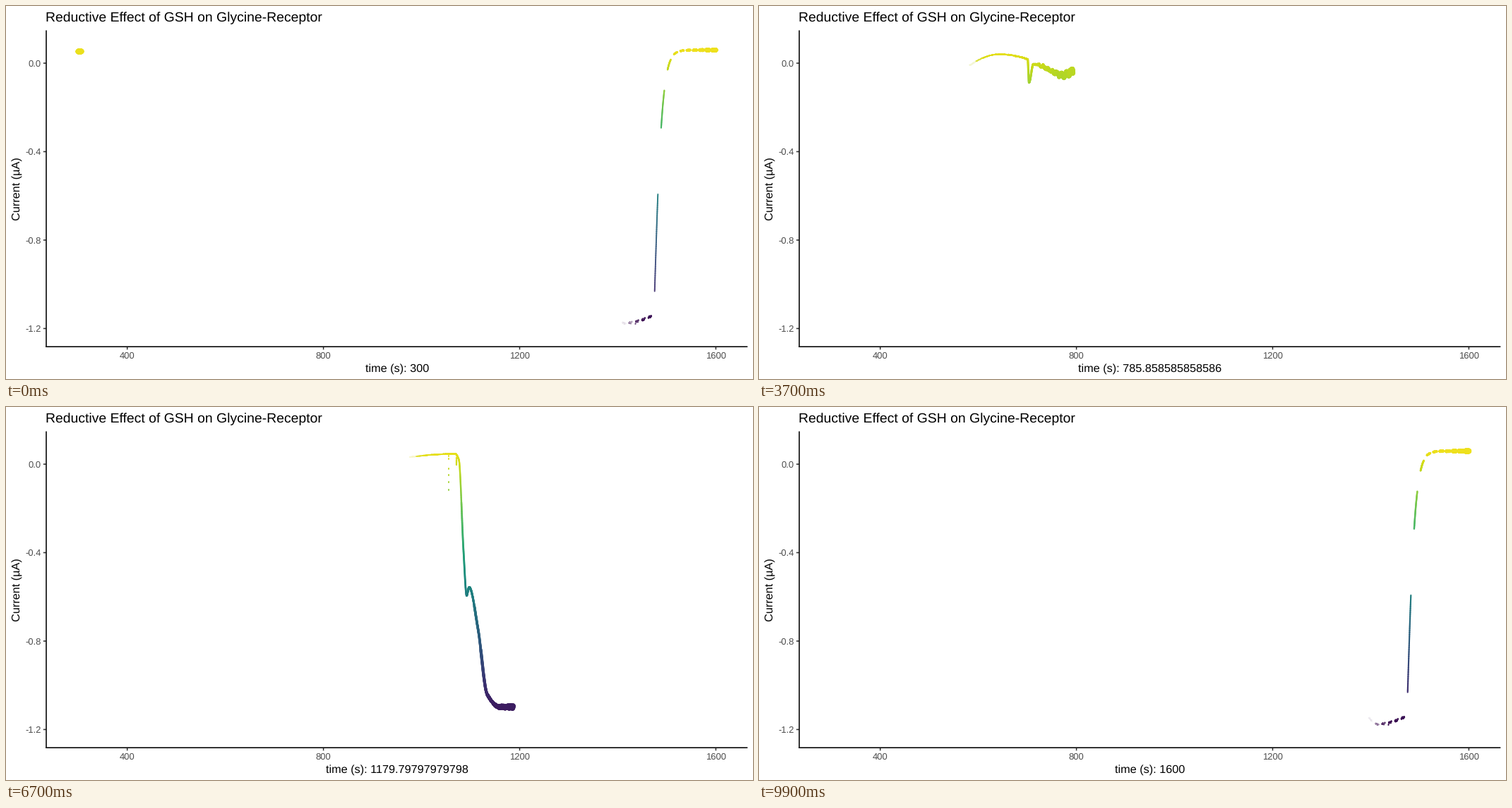
These frames come from a looping animation (1058x529 px, 10000 ms). A matplotlib script:

```python
import numpy as np
import matplotlib.pyplot as plt
from matplotlib.animation import FuncAnimation
from matplotlib.collections import LineCollection

W, H, FRAMES, WAKE = 1058, 529, 100, 15
PT = 0.72                       # points per pixel at 100 dpi
X0, X1 = 101.7, 1004.9          # x of 300 s and 1600 s
Y0, UNIT = 80.6, 313.6          # y of 0 uA, pixels per uA
SPEED = (X1 - X0) / 1300        # pixels per second
STEP = (X1 - X0) / (FRAMES - 1)
RATE = 500                      # samples per second
DX = 0.1
SPARSE = 83                     # later slices hold only their first half

plt.rcParams["font.family"] = "Liberation Sans"
plt.rcParams["text.hinting"] = "none"
fig = plt.figure(figsize=(W / 100, H / 100), dpi=100, facecolor="white")
ax = fig.add_axes([0, 0, 1, 1])
ax.set_xlim(-0.5, W - 0.5)
ax.set_ylim(H - 0.5, -0.5)
ax.axis("off")

# turning points of the current, then the washouts: start, from, to, length
KEYS = np.array([
    (101, 64), (163, 64), (166, 72), (170.5, 180), (180.7, 345), (186.5, 327),
    (200, 404), (222, 461), (250.3, 446), (298, 84), (340, 68), (380, 75),
    (382, 108), (388, 82), (432, 98), (448, 90), (470, 103), (526, 104),
    (537, 83), (554, 73), (636, 66), (641, 75), (647.5, 204), (652, 267),
    (655.5, 255), (668, 314), (681, 407), (699, 425), (718, 424), (817, 63),
    (828, 200), (845, 399), (876, 449), (917, 437), (1005, 62)])
WASHOUTS = [(250.3, 446, 83, 48), (718, 424, 63, 90), (917, 437, 62, 88)]
SPIKES = [(475, 80, 106), (488, 97, 127), (626, 66, 171), (637, 67, 83),
          (790, 54, 72), (972, 58, 66)]


def monotone(px, py, x):
    """Cubic interpolation without overshoot."""
    h = np.diff(px)
    d = np.diff(py) / h
    m = np.zeros(len(px))
    a, b = d[:-1], d[1:]
    ok = a * b > 0
    m[1:-1][ok] = 2 * a[ok] * b[ok] / (a[ok] + b[ok])
    i = np.clip(np.searchsorted(px, x, side="right") - 1, 0, len(h) - 1)
    s = (x - px[i]) / h[i]
    return (py[i] * (1 + 2 * s) * (1 - s) ** 2 + py[i + 1] * s * s * (3 - 2 * s)
            + h[i] * (m[i] * s * (1 - s) ** 2 - m[i + 1] * s * s * (1 - s)))


def trace():
    rng = np.random.default_rng(4)
    x = np.arange(X0, X1 + DX / 2, DX)
    y = monotone(KEYS[:, 0], KEYS[:, 1], x)
    for start, high, low, length in WASHOUTS:
        on = (x >= start) & (x < start + length)
        y[on] = low + (high - low) * np.exp(-((x[on] - start) / 8.8) ** 1.2)
    noise = np.convolve(rng.normal(size=len(x)), np.ones(6) / 6 ** 0.5, "same")
    unrest = np.clip(np.minimum(x - 390, 550 - x) / 12, 0, 1)
    jitter = 0.15 + 0.6 * (y > 422) + 0.9 * unrest
    return x, y + jitter * noise + 1.8 * unrest * np.sin(x * 0.95)


def build_segments():
    pts = np.column_stack(trace())
    line = np.stack([pts[:-1], pts[1:]], axis=1)
    dots = [[(x, y), (x, y + 0.8)] for x, top, bottom in SPIKES
            for y in top + (bottom - top) * np.linspace(0, 1, 12) ** 1.6]
    segs = np.concatenate([line, np.array(dots)])

    length = np.hypot(*(segs[:, 1] - segs[:, 0]).T)
    density = RATE * DX / SPEED / length          # samples per pixel of path

    mid = segs.mean(axis=1)
    pos = (mid[:, 0] - X0) / STEP
    slot = np.clip(np.round(pos), 0, FRAMES - 1).astype(int)
    keep = (slot < SPARSE) | (pos <= slot)

    level = np.clip(((Y0 - mid[:, 1]) / UNIT + 1.218) / 1.301, 0, 1)
    rgb = plt.get_cmap("viridis")(level)[:, :3] * (0.82 + 0.16 * level[:, None])
    return segs[keep], slot[keep], rgb[keep], density[keep]


def label(x, y, s, size, color="black", **kw):
    return ax.text(x, y, s, fontsize=size * PT, color=color, **kw)


def rule(xs, ys, color="black"):
    ax.plot(xs, ys, color=color, lw=1.57 * PT, solid_capstyle="butt", snap=False)


def draw_axes():
    for i in range(4):
        x = 171.2 + 277.9 * i
        rule([x, x], [482.7, 486.8], "#333333")
        label(x, 499.2, str(400 * (i + 1)), 12.97, "#4d4d4d", ha="center")
        y = Y0 + 0.4 * UNIT * i
        rule([52.4, 56.5], [y, y], "#333333")
        label(49.2, y + 4.6, "%.1f" % (-0.4 * i if i else 0), 12.97, "#4d4d4d",
              ha="right")
    rule([56.5, 56.5], [34, 483.4])
    rule([55.7, 1049.8], [482.7, 482.7])
    label(56, 22, "Reductive Effect of GSH on Glycine-Receptor", 19.4)
    label(19.5, 258.5, "Current (\u00b5A)", 16.2, rotation=90,
          rotation_mode="anchor", ha="center")


SEGS, SLOT, RGB, DENSITY = build_segments()
draw_axes()
clock = label(553.2, 518, "", 16.2, ha="center")
wake = LineCollection([], capstyle="round", zorder=3)
ax.add_collection(wake, autolim=False)


def update(n):
    lag = (n - SLOT) % FRAMES
    order = np.argsort(-lag, kind="stable")
    order = order[lag[order] <= WAKE]
    fade = (1 - lag[order] / (WAKE + 1)) ** 3
    width = 1.6 + 6.1 * fade
    # overlapping faint samples add up to this cover
    cover = 1 - np.exp(-fade * width * DENSITY[order])
    wake.set_segments(SEGS[order])
    wake.set_color(1 - (1 - RGB[order]) * cover[:, None])
    wake.set_linewidth(width * PT)
    clock.set_text("time (s): %.15g" % (300 + 1300 * n / (FRAMES - 1)))
    return wake, clock


anim = FuncAnimation(fig, update, frames=FRAMES, interval=100,
                     repeat=True, repeat_delay=0, blit=False)
plt.show()
```
